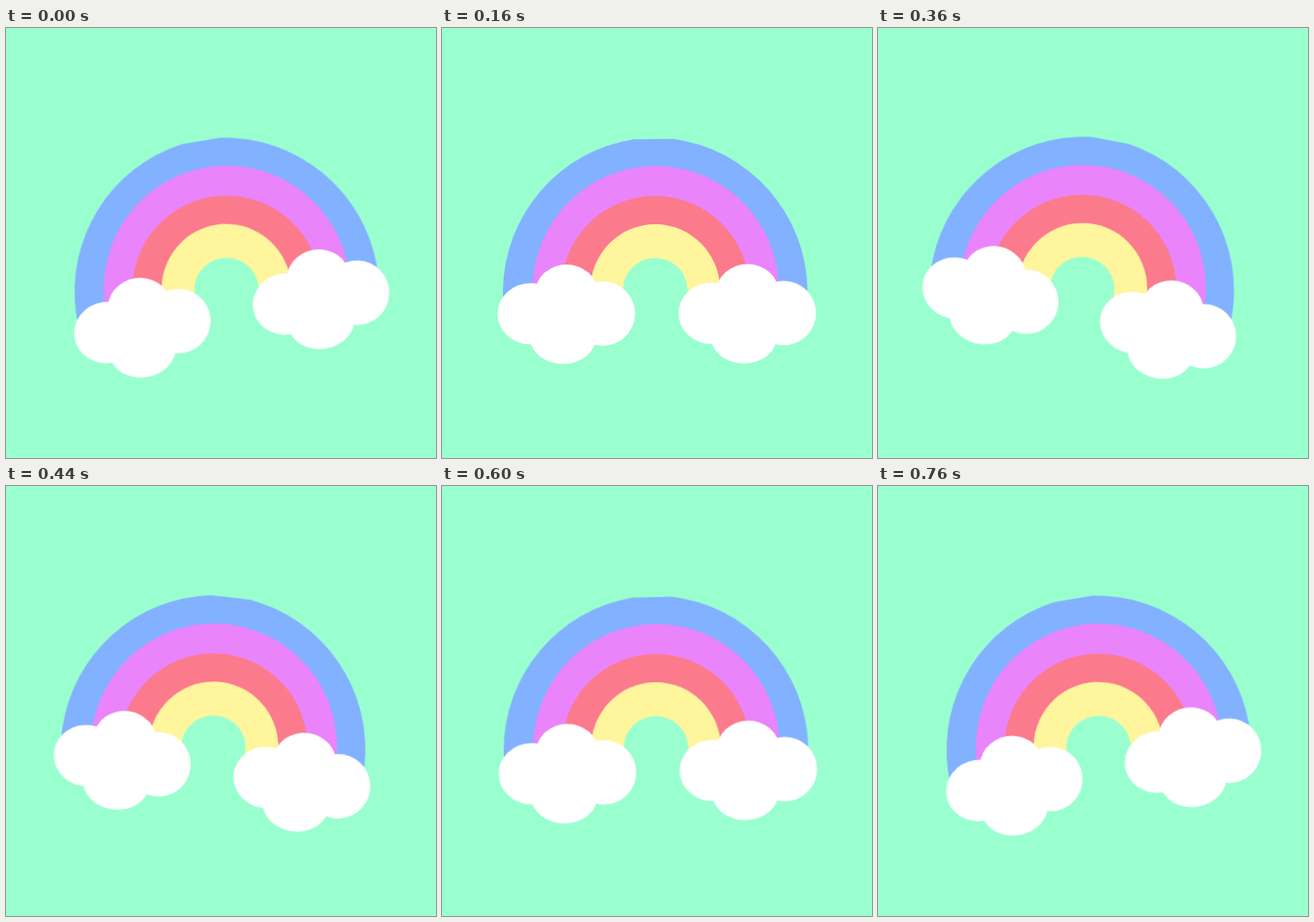
An HTML page for the animation above (0.8 s loop, 480 by 480 pixels).

```html
<!DOCTYPE html>
<html lang="en">
<head>
<meta charset="utf-8">
<title>Rocking rainbow</title>
<style>
  :root { --sky: #99ffcf; }
  html, body {
    margin: 0;
    width: 100%;
    height: 100%;
    overflow: hidden;
    background: var(--sky);
  }
  svg { display: block; width: 100vw; height: 100vh; }
  .rock {
    transform-origin: 240px 240px;
    animation: rock 800ms infinite;
  }
  /* 25 drawings a second: nine steps over, ten steps back, one held */
  @keyframes rock {
    0%   { transform: rotate(-8.9deg); animation-timing-function: steps(9, end); }
    45%  { transform: rotate(11.1deg); animation-timing-function: steps(10, end); }
    95%, 100% { transform: rotate(-8.9deg); }
  }
  .blue   { fill: #82b1ff; }
  .pink   { fill: #ea84fb; }
  .red    { fill: #fb7a8c; }
  .yellow { fill: #fff59d; }
  .hole   { fill: var(--sky); }
  .cloud  { fill: #fff; }
</style>
</head>
<body>
<svg viewBox="0 0 480 480">
  <defs>
    <g id="cloud">
      <ellipse cx="99" cy="319" rx="37" ry="34.3"/>
      <ellipse cx="139" cy="296" rx="35" ry="32"/>
      <ellipse cx="179.5" cy="318.7" rx="36" ry="36"/>
      <ellipse cx="135" cy="345" rx="37" ry="30"/>
      <path d="M107 290H172V350H100Z"/>
    </g>
  </defs>
  <g class="rock">
    <path class="blue" d="M68 305V293A173 173 0 0 1 214 124.2L258 123.8A173 173 0 0 1 408 293V305Z"/>
    <path class="pink" d="M101 305V292.5A137.5 138.5 0 0 1 376 292.5V305Z"/>
    <path class="red" d="M133 305V292.5A105 105 0 0 1 343 292.5V305Z"/>
    <path class="yellow" d="M165.5 305V292.5A72.5 73.5 0 0 1 310.5 292.5V305Z"/>
    <path class="hole" d="M202 306V292.5A36 35.7 0 0 1 274 292.5V306Z"/>
    <g class="cloud">
      <use href="#cloud"/>
      <use href="#cloud" x="202" y="-0.5"/>
    </g>
  </g>
</svg>
</body>
</html>
```
